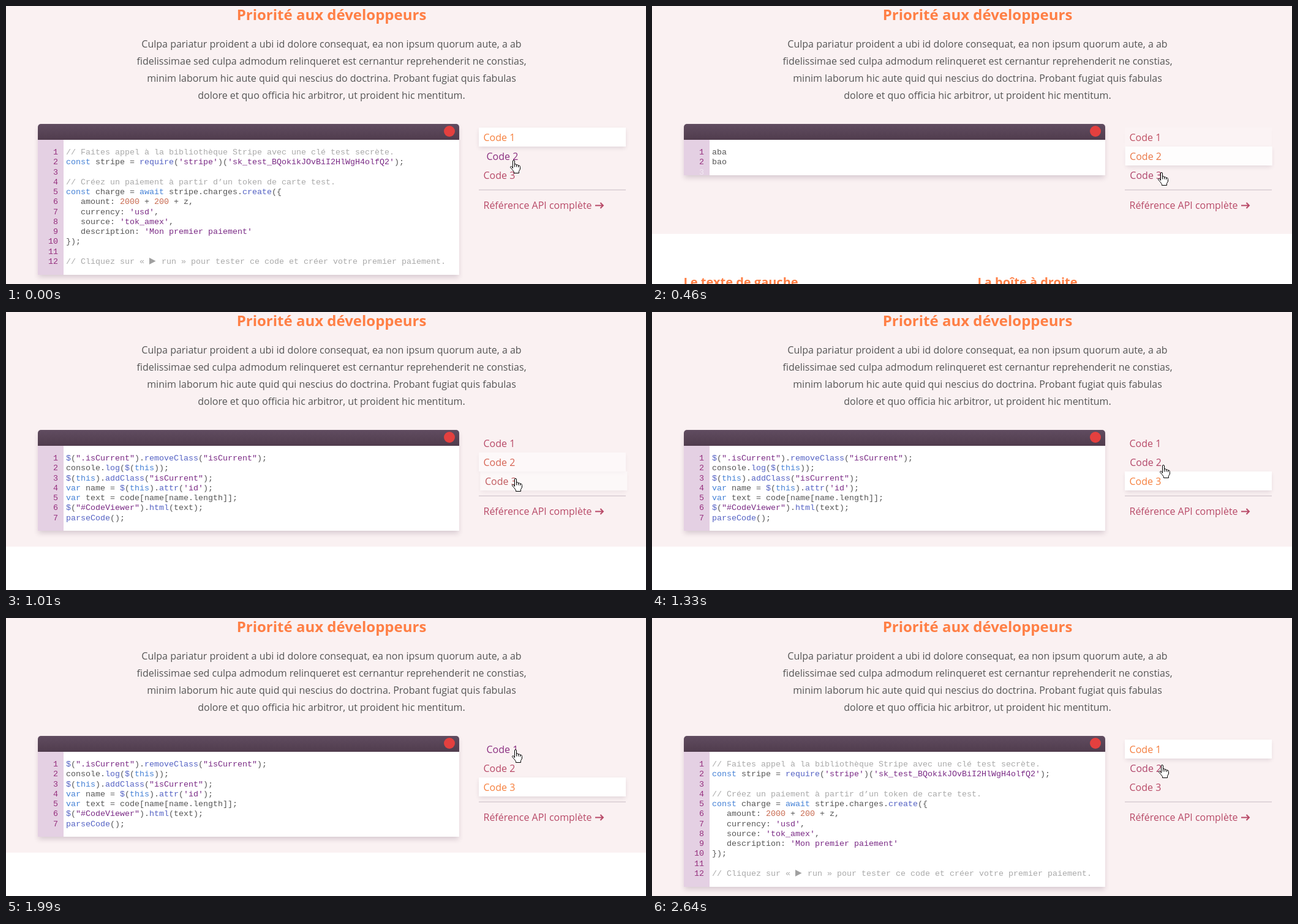
Animation of 1045x455 px, one loop 2710 ms. Source, as an HTML page:

```html
<!DOCTYPE html>
<html lang="fr">
<head>
<meta charset="utf-8">
<title>Priorité aux développeurs</title>
<style>
  html, body { margin: 0; width: 100%; height: 100%; overflow: hidden; background: #fff; }
  body { position: relative; font: 16px/28px "Open Sans", sans-serif; color: #555; }
  h1, h2, p, ul, pre { margin: 0; padding: 0; }
  h1, h2 { color: #ff7f45; font-weight: 700; line-height: 28px; white-space: nowrap; }
  #stage { position: absolute; left: 0; top: 0; width: 1045px; height: 455px; overflow: hidden; }
  #intro { position: absolute; left: 0; top: 0; width: 1045px; background: #faf1f2; }
  h1 { position: absolute; left: 0; top: 0; width: 1063px; text-align: center; font-size: 24px; }
  p { position: absolute; left: 0; top: 48px; width: 1063px; text-align: center; white-space: nowrap; }
  #below { position: absolute; left: 0; width: 1045px; }
  h2 { position: absolute; top: 65px; font-size: 20px; }

  #panel { position: absolute; left: 52px; top: 193px; width: 688px; border-radius: 5px 5px 0 0;
    background: #fff; box-shadow: 0 5px 9px -1px rgba(60, 30, 60, .18); }
  #bar { height: 26px; border-radius: 5px 5px 0 0; background: linear-gradient(#604c60, #503c4d); }
  #bar::after { content: ""; position: absolute; left: 662.5px; top: 3px; width: 18px; height: 18px;
    border-radius: 50%; background: #e4403f; }
  #body { position: relative; overflow: hidden; background: linear-gradient(90deg, #e4d0e3 42px, #fff 0); }
  pre { position: absolute; top: 13px; font: 13.333px/16.27px "Liberation Mono", "Courier New", monospace; }
  .code { left: 46px; color: #555; }
  #numbers { left: 0; width: 33px; text-align: right; color: #96307f; }
  #numbers .ghost { color: rgba(255, 255, 255, .5); }
  .comment { color: #a9a9a9; }
  .string { color: #7a2a85; }
  .keyword { color: #4380d6; }
  .call { color: #5462c4; }
  .number { color: #c86a50; }
  .play { display: inline-block; width: 12px; height: 11px; background: #a0a0a0;
    vertical-align: -1px; clip-path: polygon(0 0, 88% 50%, 0 100%); }

  ul { position: absolute; left: 772px; top: 199px; width: 240px; list-style: none; }
  li, #reference { height: 31px; line-height: 33px; padding-left: 7.5px; white-space: nowrap; }
  #rule { position: absolute; left: 772px; top: 300px; width: 240px; height: 2px; background: #e0d5da; }
  #reference { position: absolute; left: 772px; top: 310px; color: #b84a68; }
  #reference svg { margin-left: 4px; vertical-align: -1px; }
  #hand { position: absolute; left: 0; top: 0; }
</style>
</head>
<body>
<div id="stage">
  <div id="intro"></div>
  <h1>Priorité aux développeurs</h1>
  <p>Culpa pariatur proident a ubi id dolore consequat, ea non ipsum quorum aute, a ab<br>
    fidelissimae sed culpa admodum relinqueret est cernantur reprehenderit ne constias,<br>
    minim laborum hic aute quid qui nescius do doctrina. Probant fugiat quis fabulas<br>
    dolore et quo officia hic arbitror, ut proident hic mentitum.</p>
  <div id="below">
    <h2 style="left:51.5px">Le texte de gauche</h2>
    <h2 style="left:531.5px">La boîte à droite</h2>
  </div>
  <div id="panel">
    <div id="bar"></div>
    <div id="body"><pre id="numbers"></pre></div>
  </div>
  <ul><li>Code 1</li><li>Code 2</li><li>Code 3</li></ul>
  <div id="rule"></div>
  <div id="reference">Référence API complète<svg width="16" height="13" fill="none" stroke="#b84a68" stroke-width="2"><path d="M1 6.5H14M9.5 2L14 6.5 9.5 11"/></svg></div>
  <svg id="hand" width="18" height="23" fill="#fff" stroke="#000" stroke-linejoin="round">
    <path d="M4.5 13.5V2Q4.5 .5 6 .5T7.5 2V7.5Q8 6.5 9 6.7T10.5 8Q12.5 7 13.5 9Q16.5 8.5 16.5 11.5V15L14.5 18.5V21.5H6.5V19.5L3.5 15.5 .8 12.5Q.2 10.8 1.5 10.5T3.2 11.5Z"/>
    <path d="M7.5 7V11.5M10.5 8V11.5M13.5 9V12" fill="none"/>
  </svg>
</div>
<script>
const LOOP = 2710, FADE = 500, LINE = 16.27;
const $ = id => document.getElementById(id);

const snippets = [
`// Faites appel à la bibliothèque Stripe avec une clé test secrète.
const stripe = require('stripe')('sk_test_BQokikJOvBiI2HlWgH4olfQ2');

// Créez un paiement à partir d’un token de carte test.
const charge = await stripe.charges.create({
   amount: 2000 + 200 + z,
   currency: 'usd',
   source: 'tok_amex',
   description: 'Mon premier paiement'
});

// Cliquez sur « ▶ run » pour tester ce code et créer votre premier paiement.`,
`aba
bao`,
`$(".isCurrent").removeClass("isCurrent");
console.log($(this));
$(this).addClass("isCurrent");
var name = $(this).attr('id');
var text = code[name[name.length]];
$("#CodeViewer").html(text);
parseCode();`];

const tokens = /(?<comment>\/\/.*)|(?<string>'[^']*'|"[^"]*")|(?<keyword>\b(?:const|await|var|this)\b)|(?<number>\b\d+\b)|(?<call>[\w$]+(?=\())/g;

function highlight(text) {
  return text.replace(tokens, (word, ...rest) => {
    const groups = rest.pop();
    const kind = Object.keys(groups).find(key => groups[key]);
    return `<span class="${kind}">${word}</span>`;
  }).replace("▶", '<span class="play"></span>');
}

const views = snippets.map(text => {
  const pre = document.createElement("pre");
  pre.className = "code";
  pre.innerHTML = highlight(text);
  $("body").append(pre);
  return pre;
});

// Link looks: shift, red, green, blue, highlight opacity
const idle = [0, 184, 74, 104, 0];
const hover = [5, 138, 47, 128, 0];
const active = [0, 246, 128, 62, 1];

const links = [
  [[0, active], [160, idle], [1500, hover], [2235, active]],
  [[0, hover], [160, active], [860, idle], [1270, hover], [1500, idle], [2570, hover]],
  [[0, idle], [390, hover], [860, active], [2235, idle]]
];
const swaps = [[0, 0], [210, 1], [960, 2], [2220, 0]];
const handPath = [[0, 823, 252], [270, 823, 252], [460, 826, 272], [1190, 826, 272], [1330, 829, 250],
  [1400, 829, 250], [1610, 826, 215], [2470, 826, 215], [2640, 827, 240], [LOOP, 827, 240]];

// The picture is refreshed at these moments and holds in between
const ticks = [0, 160, 220, 270, 340, 410, 460, 510, 560, 690,
  860, 910, 960, 1010, 1070, 1130, 1190, 1260, 1330,
  1400, 1460, 1510, 1570, 1630, 1690, 1740, 1800, 1860, 1990,
  2220, 2270, 2350, 2420, 2470, 2510, 2560, 2600, 2640];

const mix = (a, b, k) => a.map((v, i) => v + (b[i] - v) * k);

// cubic-bezier(.25, .1, .25, 1)
function ease(x) {
  if (x >= 1) return 1;
  let low = 0, high = 1;
  for (let i = 0; i < 20; i++) {
    const s = (low + high) / 2, r = 1 - s;
    if (.75 * s * r * r + .75 * s * s * r + s ** 3 < x) low = s; else high = s;
  }
  const r = 1 - low;
  return .3 * low * r * r + 3 * low * low * r + low ** 3;
}

function lookAt(events, t) {
  let look = events[0][1];
  for (let i = 1; i < events.length && events[i][0] <= t; i++) {
    const end = Math.min(t, events[i + 1]?.[0] ?? LOOP);
    look = mix(look, events[i][1], ease((end - events[i][0]) / FADE));
  }
  return look;
}

let shown = -1;
function showCode(index) {
  if (index === shown) return;
  shown = index;
  views.forEach((view, i) => view.hidden = i !== index);
  const count = snippets[index].split("\n").length;
  const height = Math.floor(25.8 + LINE * count);
  $("body").style.height = height + "px";
  $("numbers").innerHTML = Array.from({ length: count }, (_, i) => i + 1).join("\n") +
    (count < 3 ? '\n<span class="ghost">3</span>' : "");
  const bottom = Math.max(373, 219 + height + 26);
  $("intro").style.height = $("below").style.top = bottom + "px";
}

const items = document.querySelectorAll("li");
function draw(t) {
  showCode(swaps.findLast(swap => swap[0] <= t)[1]);
  items.forEach((item, i) => {
    const [x, r, g, b, a] = lookAt(links[i], t);
    item.style.transform = `translateX(${x}px)`;
    item.style.color = `rgb(${r}, ${g}, ${b})`;
    item.style.background = `rgba(255, 255, 255, ${a})`;
    item.style.boxShadow = `0 3px 7px -1px rgba(60, 30, 60, ${.14 * a})`;
  });
  const next = handPath.findIndex(point => point[0] > t);
  const from = handPath[next - 1], to = handPath[next];
  const [, x, y] = mix(from, to, (t - from[0]) / (to[0] - from[0]));
  $("hand").style.transform = `translate(${Math.round(x)}px, ${Math.round(y)}px)`;
}

const start = performance.now();
function frame() {
  const t = (performance.now() - start) % LOOP;
  draw(ticks.findLast(tick => tick <= t));
  requestAnimationFrame(frame);
}
frame();
</script>
</body>
</html>
```
